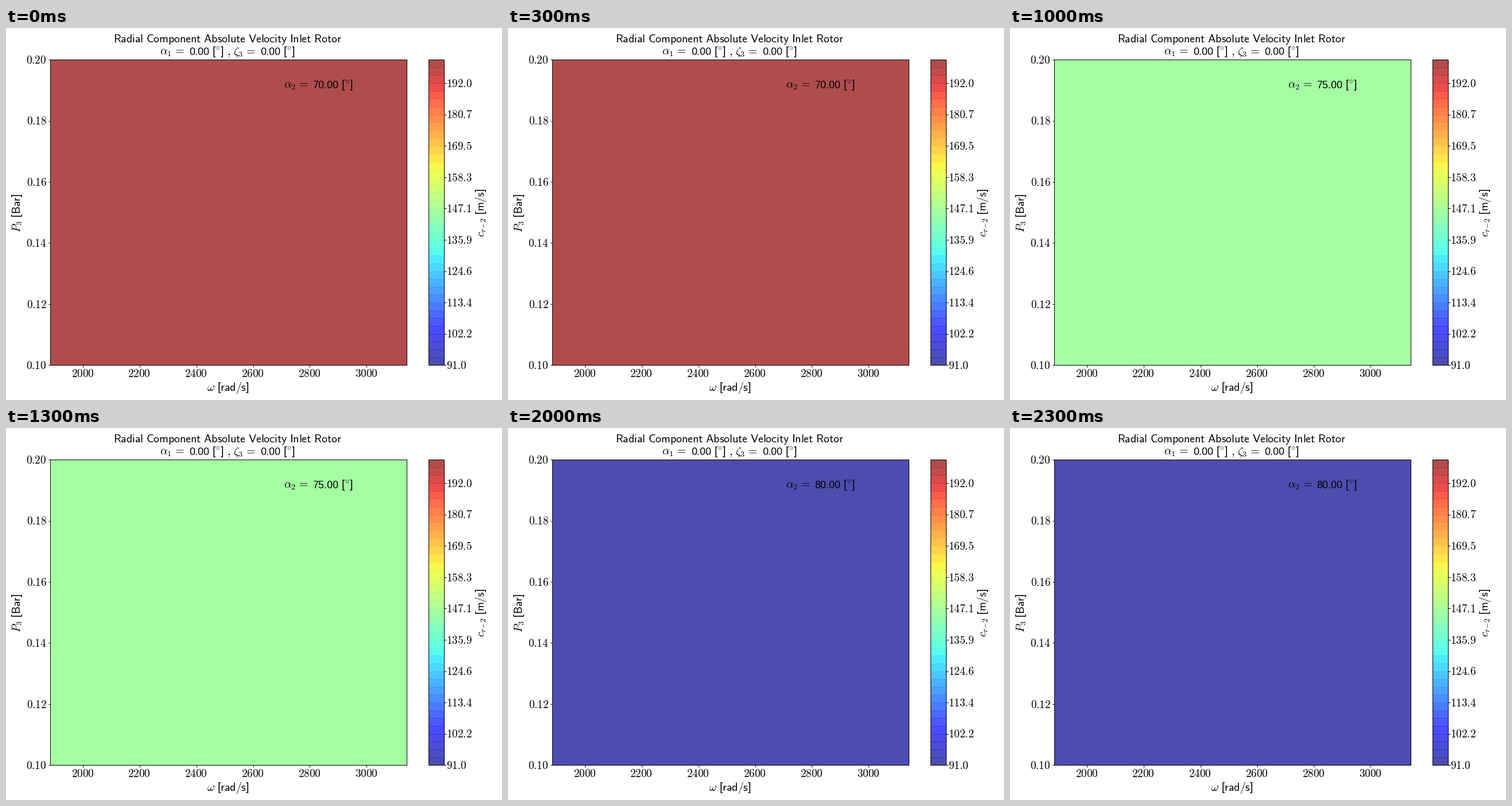
Recreate the animation shown at these times as a matplotlib script. Size 864 by 648 pixels, loop 2.5 s.

```python
import numpy as np
import matplotlib.pyplot as plt
from matplotlib.animation import FuncAnimation

W, H, DPI = 864, 648, 72
BANDS = 39
ALPHA = 0.7
TOP, BOTTOM = 55.2, 587.2

plt.rcParams.update({
    "mathtext.fontset": "cm",
    "font.family": "Liberation Sans",
    "axes.linewidth": 1,
    "xtick.major.width": 1,
    "ytick.major.width": 1,
})

fig = plt.figure(figsize=(W / DPI, H / DPI), dpi=DPI, facecolor="white")


def pixel_axes(left, right):
    box = [left / W, 1 - BOTTOM / H, (right - left) / W, (BOTTOM - TOP) / H]
    return fig.add_axes(box)


def put(x, y, s, size=19.8, ha="center", rotation=0):
    """Place a formula with its baseline at pixel (x, y), y downwards."""
    return fig.text(x / W, 1 - y / H, f"${s}$", size=size, ha=ha,
                    va="baseline", rotation=rotation, rotation_mode="anchor")


def sans(s):
    return r"\mathsf{" + s.replace(" ", r"\ ") + "}"


def upright(s):
    return r"\mathregular{" + s + "}"


def unit(s):
    return upright("[") + s + upright("]")


def angle(left, right, y, symbol, value):
    """Write 'symbol = value [deg]' between two x positions."""
    put(left, y, symbol + r"\hspace{0.13}=", ha="left")
    put(right, y, unit(r"{}^{\circ}"), ha="right")
    return put(right - 25, y, upright(f"{value:.2f}"), 17.8, ha="right")


def band_color(i):
    return plt.cm.jet((i + 0.5) / BANDS)


def on_white(color):
    return tuple(ALPHA * c + 1 - ALPHA for c in color[:3])


# Main field
ax = pixel_axes(77.2, 698.2)
ax.set_xlim(600 * np.pi, 1000 * np.pi)
ax.set_ylim(0.10, 0.20)
ax.set_xticks(range(2000, 3001, 200))
ax.set_yticks(np.linspace(0.10, 0.20, 6))
ax.tick_params(labelbottom=False, labelleft=False)

for v in range(2000, 3001, 200):
    x = 77.2 + 621 * (v / np.pi - 600) / 400
    put(x - 0.5, 608, str(v), 19.3)
for k in range(6):
    y = BOTTOM - k * (BOTTOM - TOP) / 5
    put(71, y + 6.7, f"{0.10 + 0.02 * k:.2f}", 19.3, ha="right")

# Colour bar: a faint darker row where neighbouring bands meet
bar = pixel_axes(736.2, 763.2)
bar.set_xlim(0, 1)
bar.set_ylim(0, BANDS)
row = BANDS / (BOTTOM - TOP)
for i in range(BANDS):
    color = band_color(i)
    bar.axhspan(i, i + 1, color=color, alpha=ALPHA, lw=0)
    bar.axhspan(i - row, i, color=color, alpha=ALPHA / 2, lw=0)
bar.set_xticks([])
bar.yaxis.tick_right()
bar.set_yticks(range(0, BANDS, 4))
bar.tick_params(labelright=False)

for k in range(10):
    y = BOTTOM - 4 * k / row
    put(767, y + 6.7, f"{90.98 + 11.22 * k:.1f}", 19.3, ha="left")

# Titles and axis names
put(385.7, 25, sans("Radial Component Absolute Velocity Inlet Rotor"))
angle(267.5, 380, 47, r"\alpha_1", 0)
put(388, 47, sans(","))
angle(396.5, 503.5, 47, r"\zeta_3", 0)
put(387, 632, r"\omega\ " + unit(sans("rad/s")))
put(25, 322.5, r"P_3\ " + unit(sans("Bar")), rotation=90)
put(832.5, 321.5, r"c_{r\hspace{-0.2}-\hspace{-0.2}2}\ " + unit(sans("m/s")),
    rotation=90)
note = angle(484, 604.5, 105, r"\alpha_2", 70)

STEPS = [38, 29, 19, 9, 0]


def update(n):
    ax.set_facecolor(on_white(band_color(STEPS[n])))
    note.set_text(f"${upright(f'{70 + 2.5 * n:.2f}')}$")
    return ax.patch, note


anim = FuncAnimation(fig, update, frames=len(STEPS), interval=500, repeat=True)
plt.show()
```
